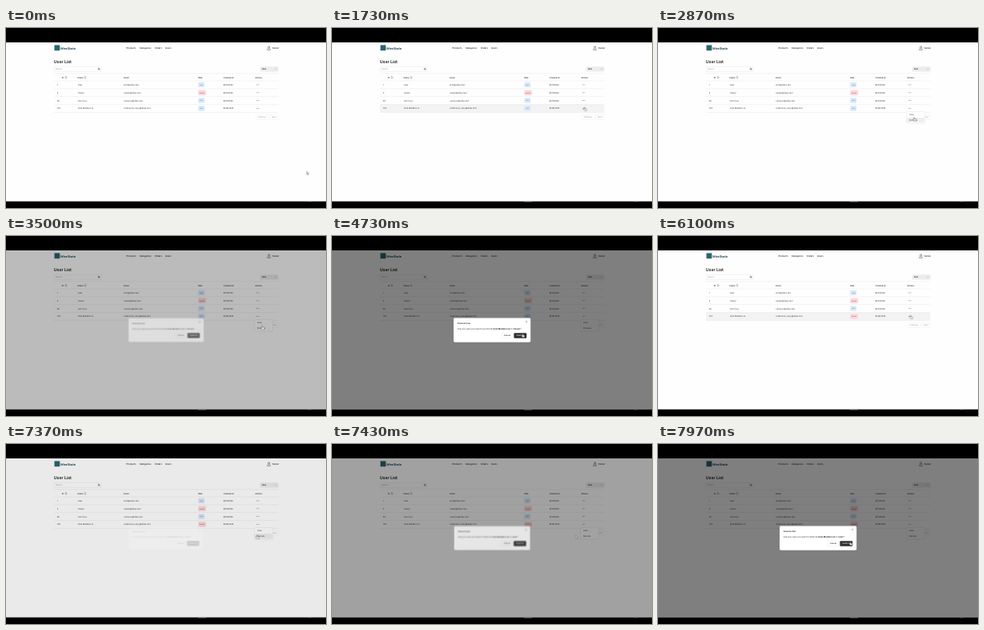
Animation of 400 by 225 pixels, one loop 8000 ms. Source, as an HTML page:

```html
<!DOCTYPE html>
<html lang="en">
<head>
<meta charset="utf-8">
<title>User List</title>
<style>
html, body { margin: 0; width: 100%; height: 100%; overflow: hidden; background: #000; }
svg { display: block; width: 100vw; height: 100vh; }
text { font: 2.5px Inter, Roboto, sans-serif; fill: #333; text-rendering: geometricPrecision; }
.bold, tspan { font-weight: 600; fill: #1c1c1f; }
.nav { font-size: 2.8px; font-weight: 500; fill: #222; }
.brand { font-size: 3.7px; font-weight: 700; fill: #21404d; }
.title { font-size: 5.2px; font-weight: 600; fill: #18181b; }
.head { font-weight: 500; fill: #222; }
.soft { fill: #999; }
.mid { text-anchor: middle; }
.body { font-size: 2.72px; }
.line { fill: none; stroke: #e2e2e5; stroke-width: .4; }
.icon { fill: none; stroke: #444; stroke-width: .45; stroke-linecap: round; stroke-linejoin: round; }

.anim, .anim * { animation-duration: 8s; animation-iteration-count: infinite; }
.hover { animation-name: hover; animation-timing-function: step-end; }
.before { animation-name: before; animation-timing-function: step-end; }
.after { animation-name: after; animation-timing-function: step-end; }
.menu { animation-name: menu; transform-origin: 316px 104px; }
.shade { animation-name: shade; }
.dialog { animation-name: shade, zoom; transform-origin: 200px 117.5px; }
.pick { animation-name: pick; animation-timing-function: step-end; }
.press { animation-name: press; animation-timing-function: step-end; }
.cursor { animation-name: move; animation-timing-function: ease-in-out; }
.arrow { animation-name: arrow; animation-timing-function: step-end; }
.hand { animation-name: hand; animation-timing-function: step-end; }
.dash { animation-name: dash; animation-timing-function: step-end; }

@keyframes hover {
  0%, 24%, 80.6%, 100% { opacity: 0; }
  14.8%, 75.2% { opacity: 1; }
}
@keyframes before { 0% { opacity: 1; } 66.2%, 100% { opacity: 0; } }
@keyframes after { 0% { opacity: 0; } 66.2%, 100% { opacity: 1; } }
@keyframes menu {
  0%, 24%, 66%, 80.6% { opacity: 0; transform: scale(.95); }
  25.8%, 64.1%, 82.4%, 100% { opacity: 1; transform: none; }
}
@keyframes shade {
  0%, 43%, 66.6%, 91.8% { opacity: 0; }
  45.5%, 64.1%, 94.3%, 100% { opacity: 1; }
}
@keyframes zoom {
  0%, 43%, 66.6%, 91.8% { transform: scale(.95); }
  45.5%, 64.1%, 94.3%, 100% { transform: none; }
}
@keyframes pick {
  0%, 43%, 92.3%, 100% { opacity: 0; }
  32%, 83% { opacity: 1; }
}
@keyframes press {
  0%, 67%, 100% { fill: #18181b; }
  51.5%, 98.5% { fill: #2f2f32; }
}
@keyframes move {
  0%, .4% { transform: translate(377px, 181.5px); }
  10.4% { transform: translate(331px, 122px); }
  16.5%, 25% { transform: translate(316.3px, 101.3px); }
  31%  { transform: translate(320px, 111px); }
  37.5%, 43.75% { transform: translate(321px, 114.5px); }
  52.5%, 63.7% { transform: translate(238.7px, 124.5px); }
  67.8%, 71.2% { transform: translate(248.5px, 127px); }
  76.2%, 80.4% { transform: translate(316.3px, 101.3px); }
  84.1% { transform: translate(319px, 115px); }
  86.2%, 91.7% { transform: translate(319.5px, 116px); animation-timing-function: linear; }
  92.9% { transform: translate(305.5px, 116.5px); animation-timing-function: ease-out; }
  99.6%, 100% { transform: translate(241px, 124.5px); }
}
@keyframes arrow {
  0%, 44.2%, 67%, 92.2% { opacity: 1; }
  15.5%, 51.5%, 75.6%, 98%, 100% { opacity: 0; }
}
@keyframes hand {
  0%, 44.2%, 67%, 92.2% { opacity: 0; }
  15.5%, 51.5%, 75.6%, 98%, 100% { opacity: 1; }
}
@keyframes dash { 0% { opacity: 0; } 10%, 100% { opacity: 1; } }
</style>
</head>
<body>
<svg viewBox="0 0 400 225" preserveAspectRatio="none">
  <defs>
    <g id="sort" class="icon" stroke-width=".35"><path d="M-.9 -.4L0 -1.3L.9 -.4M-.9 .6L0 1.5L.9 .6"/></g>
    <g id="dots" fill="#333"><circle r=".38" cx="-1.2"/><circle r=".38"/><circle r=".38" cx="1.2"/></g>
    <g id="user">
      <rect x="240.3" y="-3.2" width="7.9" height="6.4" rx="1.2" fill="#d9e9fb"/>
      <text class="mid" x="244.2" y=".8" style="fill:#3f74b5;font-size:2.2px">user</text>
    </g>
    <g id="owner">
      <rect x="240.3" y="-3.2" width="9.7" height="6.4" rx="1.2" fill="#fbd9dc"/>
      <text class="mid" x="245.1" y=".8" style="fill:#bf3540;font-size:2.2px">owner</text>
    </g>
  </defs>

  <rect width="400" height="225"/>
  <rect y="18" width="400" height="198.7" fill="#fefefe"/>

  <!-- top bar -->
  <rect x="60.5" y="21.4" width="6.8" height="6.8" fill="#2c6470"/>
  <text class="brand" x="68" y="26.6">WireGlade</text>
  <text class="nav" x="150.5" y="26">Products</text>
  <text class="nav" x="166.8" y="26">Categories</text>
  <text class="nav" x="185.8" y="26">Orders</text>
  <text class="nav" x="199" y="26">Users</text>
  <g class="icon"><circle cx="328.5" cy="23.8" r="1.1"/><path d="M326.6 27.1v-.4q0-1.1 1.2-1.1h1.4q1.2 0 1.2 1.1v.4z"/></g>
  <text class="nav" x="332.4" y="26">Owner</text>

  <!-- filters -->
  <text class="title" x="59.8" y="44.1">User List</text>
  <rect class="line" x="60" y="48.4" width="59.3" height="6" rx="1"/>
  <text class="soft" x="62" y="52.3">Search</text>
  <g class="icon" stroke-width=".35"><circle cx="115.8" cy="51.1" r=".9"/><path d="M116.5 51.8l.8 .8"/></g>
  <rect x="317.6" y="48.2" width="23" height="6.3" rx="1.2" fill="#ececee"/>
  <text class="head" x="320" y="52.3">Role</text>
  <path class="icon" style="stroke:#999" d="M336.2 51l.9 .9l.9-.9"/>

  <!-- table -->
  <g class="anim"><rect class="hover" x="60" y="95.6" width="280.5" height="9.9" fill="#f3f3f4"/></g>
  <path class="line" d="M60 56.8h280.5M60 66h280.5M60 75.8h280.5M60 85.6h280.5M60 95.6h280.5M60 105.5h280.5"/>
  <g class="head">
    <text class="head" x="69.8" y="62.6">ID</text><use href="#sort" x="75" y="61.6"/>
    <text class="head" x="89.5" y="62.6">Name</text><use href="#sort" x="98.9" y="61.6"/>
    <text class="head" x="147.2" y="62.6">Email</text>
    <text class="head" x="240.4" y="62.6">Role</text>
    <text class="head" x="271.8" y="62.6">Created At</text>
    <text class="head" x="311.4" y="62.6">Actions</text>
  </g>
  <g id="rows"></g>
  <g class="anim">
    <g class="before"><use href="#user" y="100.5"/></g>
    <g class="after"><use href="#owner" y="100.5"/></g>
  </g>
  <rect class="line" x="312.6" y="108.2" width="16" height="6.3" rx="1" opacity=".6"/>
  <rect class="line" x="329.8" y="108.2" width="10.7" height="6.3" rx="1" opacity=".6"/>
  <text class="soft" x="315.2" y="112.3">Previous</text>
  <text class="soft" x="332.3" y="112.3">Next</text>

  <g class="anim">
    <!-- row menu -->
    <g class="menu">
      <rect x="310.3" y="104.6" width="23.4" height="14.6" rx="1.2" fill="#fff" stroke="#dcdce0" stroke-width=".4"/>
      <rect class="pick" x="311.2" y="111.9" width="21.6" height="6.3" rx=".8" fill="#efeff1"/>
      <text x="314" y="109.4">View</text>
      <text class="before" x="314" y="115.9">Promote</text>
      <text class="after" x="314" y="115.9">Demote</text>
    </g>

    <!-- confirmation -->
    <rect class="shade" y="18" width="400" height="198.7" fill="#000" fill-opacity=".5"/>
    <g class="dialog">
      <rect x="152" y="102.4" width="96.2" height="30.3" rx="1.4" fill="#fff"/>
      <path class="icon" style="stroke:#777" d="M242.3 106.3l1.6 1.6m0-1.6l-1.6 1.6"/>
      <g class="before">
        <text class="bold" x="156.8" y="109.8">Promote User</text>
        <text class="body" x="156.8" y="116.7">Are you sure you want to promote <tspan>Cole Marden Ivo</tspan> to <tspan>Owner</tspan>?</text>
      </g>
      <g class="after">
        <text class="bold" x="156.8" y="109.8">Demote User</text>
        <text class="body" x="156.8" y="116.7">Are you sure you want to demote <tspan>Cole Marden Ivo</tspan> to <tspan>User</tspan>?</text>
      </g>
      <rect class="line" x="212" y="121.2" width="14" height="6.6" rx="1.1"/>
      <text class="head mid" x="219" y="125.4">Cancel</text>
      <rect class="press" x="227.4" y="121.2" width="15.8" height="6.6" rx="1.1" fill="#18181b"/>
      <text class="mid" x="235.3" y="125.4" style="fill:#fff;font-weight:500">Confirm</text>
    </g>

    <rect class="dash" x="240" y="217" width="10" height=".8" fill="#555"/>
    <rect x="377" y="217.2" width="5" height=".6" fill="#444"/>

    <g class="cursor" stroke="#222" stroke-width=".35" stroke-linejoin="round" fill="#fff">
      <path class="arrow" d="M-1.2 -2.1v3.6l.9-.8l.7 1.5l.6-.3l-.7-1.4h1.2z"/>
      <path class="hand" d="M-.9 .1v-2.1q.4-.6 .8 0v1.4l1.7 .4q.5 .2 .4 .8l-.3 1.5h-2.2l-1.5-1.8q0-.6 .5-.5z"/>
    </g>
  </g>
</svg>
<script>
const rows = [
  ["1", "User", "kim1@inbox.test", "8/19/2025", "user"],
  ["2", "Owner", "owner@inbox.test", "8/19/2025", "owner"],
  ["35", "Carl Voss", "carlvoss@inbox.test", "8/19/2025", "user"],
  ["104", "Cole Marden Ivo", "coldmarsh_ivory@inbox.test", "8/26/2025", ""]
];
const columns = [63.8, 89.8, 147.2, 271.8];

document.getElementById("rows").innerHTML = rows.map((row, i) => {
  const y = 70.9 + i * 9.87;
  const cells = columns.map((x, k) => `<text x="${x}" y="${y + .9}">${row[k]}</text>`).join("");
  const badge = row[4] ? `<use href="#${row[4]}" y="${y}"/>` : "";
  return cells + badge + `<use href="#dots" x="314.8" y="${y}"/>`;
}).join("");
</script>
</body>
</html>
```
